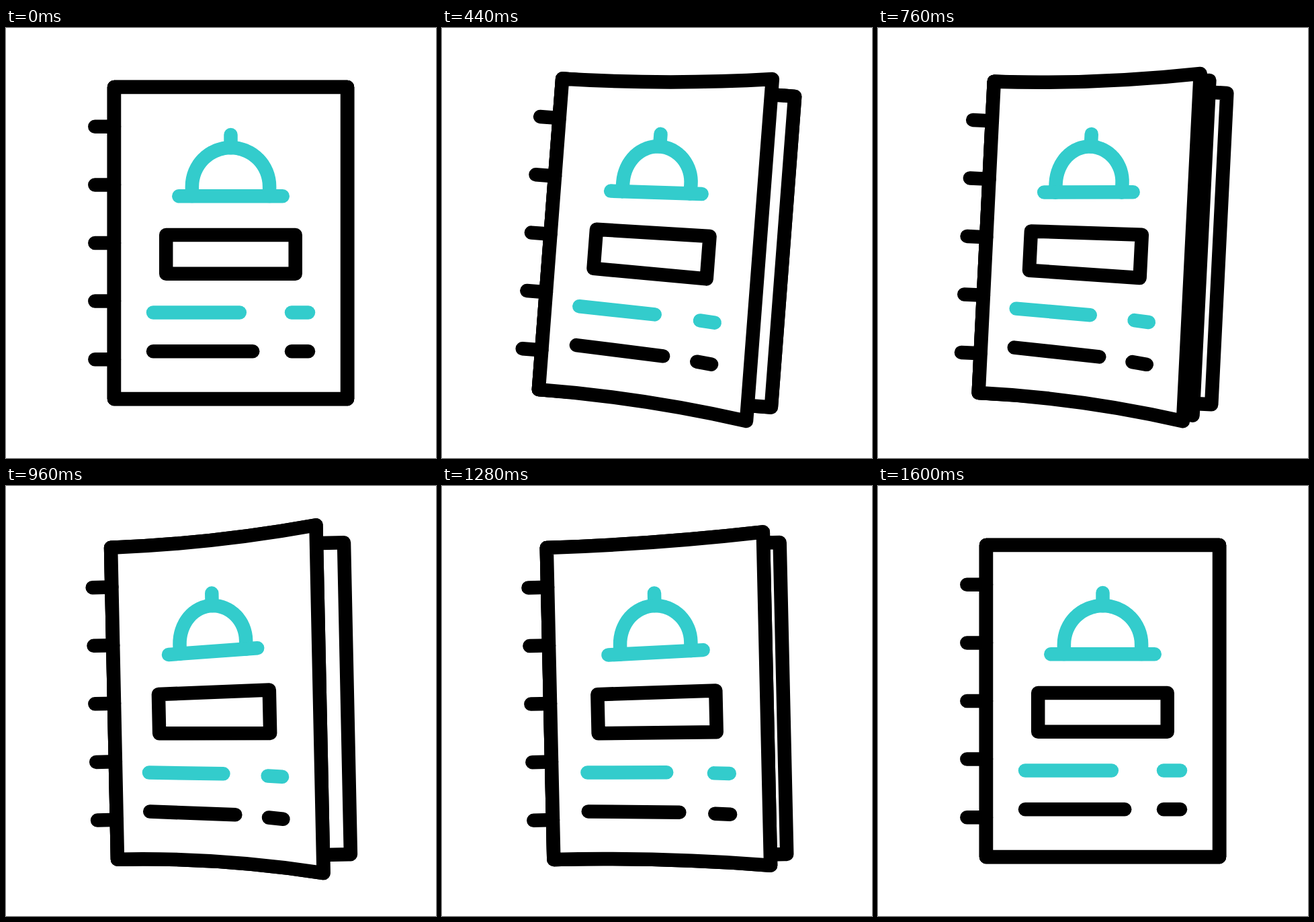
Write an HTML page that moves like this. It is 640 by 640 pixels and loops after 1.72 s.

```html
<!DOCTYPE html>
<html lang="en">
<head>
<meta charset="utf-8">
<title>Menu book</title>
<style>
html, body { margin: 0; width: 100%; height: 100%; overflow: hidden; background: #fff; }
svg { display: block; width: 100vw; height: 100vh; }
path { fill: none; stroke: #000; stroke-width: 20.5; stroke-linecap: round; stroke-linejoin: round; }
.sheet { fill: #fff; }
.teal { stroke: #33cccc; }
</style>
</head>
<body>
<svg viewBox="0 0 640 640"><g id="book"></g></svg>
<script>
const LOOP = 1720, STEP = 40;
const L = 161, R = 508, T = 88, B = 552, W = R - L;
const book = document.getElementById('book');

function addPath(cls) {
  const p = document.createElementNS('http://www.w3.org/2000/svg', 'path');
  p.setAttribute('class', cls);
  book.appendChild(p);
  return p;
}

const clamp = v => Math.min(1, Math.max(0, v));
const smooth = u => u * u * (3 - 2 * u);
const smoother = u => u * u * u * (10 + u * (6 * u - 15));
const span = (t, a, b) => clamp((t - a) / (b - a));
const swing = (t, a, b) => {
  const u = span(t, a, b);
  return (smooth(u) + smoother(u)) / 2;
};

// Rectangular sheet hinged on the left, lifted by k
function sheet(k) {
  const x = R - 41 * k, mid = (L + x) / 2, lift = 27 * k;
  return `M${L} ${T}Q${mid} ${T - lift * 0.1} ${x} ${T - lift}V${B + lift}Q${mid} ${B} ${L} ${B}Z`;
}

// Where a printed point goes when the cover is lifted by k
function warp([x, y], k) {
  const d = x - L;
  const g = y < 250
    ? -0.585 * clamp((y - 165) / 85)
    : Math.sin((y - 336) / 216 * Math.PI / 2);
  return [x - 0.143 * d * k, y + 26.5 * k * g * (d / W) ** 2];
}

function dome() {
  const cx = 334.5, cy = 235.7, r = 57.6, pts = [[cx - r, 250]];
  for (let i = 0; i <= 32; i++) {
    const a = Math.PI * (1 + i / 32);
    pts.push([cx + r * Math.cos(a), cy + r * Math.sin(a)]);
  }
  pts.push([cx + r, 250]);
  return pts;
}

const back = addPath('sheet');
const page = addPath('sheet');
const cover = addPath('sheet');
const ticks = addPath('');
back.setAttribute('d', sheet(0));
ticks.setAttribute('d', [0, 1, 2, 3, 4].map(i => `M132.3 ${146.8 + 86.6 * i}H${L}`).join(''));

const prints = [
  ['teal', [[334.5, 159], [334.5, 178]]],
  ['teal', dome()],
  ['teal', [[257.3, 250.2], [411.7, 250.2]]],
  ['', [[238.2, 308], [430.7, 308], [430.7, 365.8], [238.2, 365.8]], 'Z'],
  ['teal', [[219, 423.5], [347.8, 423.5]]],
  ['teal', [[425, 423.5], [450, 423.5]]],
  ['', [[219, 481.3], [367.2, 481.3]]],
  ['', [[425, 481.3], [450, 481.3]]]
].map(([cls, pts, end = '']) => ({ el: addPath(cls), pts, end }));

function draw(t) {
  const tilt = 5 * swing(t, 40, 572) - 7 * swing(t, 562, 1080) + 2 * swing(t, 1080, 1570);
  const close = smooth(span(t, 1115, 1495));
  const k = smooth(span(t, 150, 530)) - close;
  const kPage = smooth(span(t, 530, 910)) - close;

  book.setAttribute('transform', `rotate(${tilt} 334.5 320)`);
  page.setAttribute('d', sheet(kPage));
  cover.setAttribute('d', sheet(k));
  for (const { el, pts, end } of prints) {
    const d = pts.map(p => warp(p, k).map(v => v.toFixed(2)).join(' ')).join('L');
    el.setAttribute('d', 'M' + d + end);
  }
}

const start = performance.now();
function tick() {
  const t = (performance.now() - start) % LOOP;
  draw(Math.floor(t / STEP) * STEP);
  requestAnimationFrame(tick);
}
tick();
</script>
</body>
</html>
```
